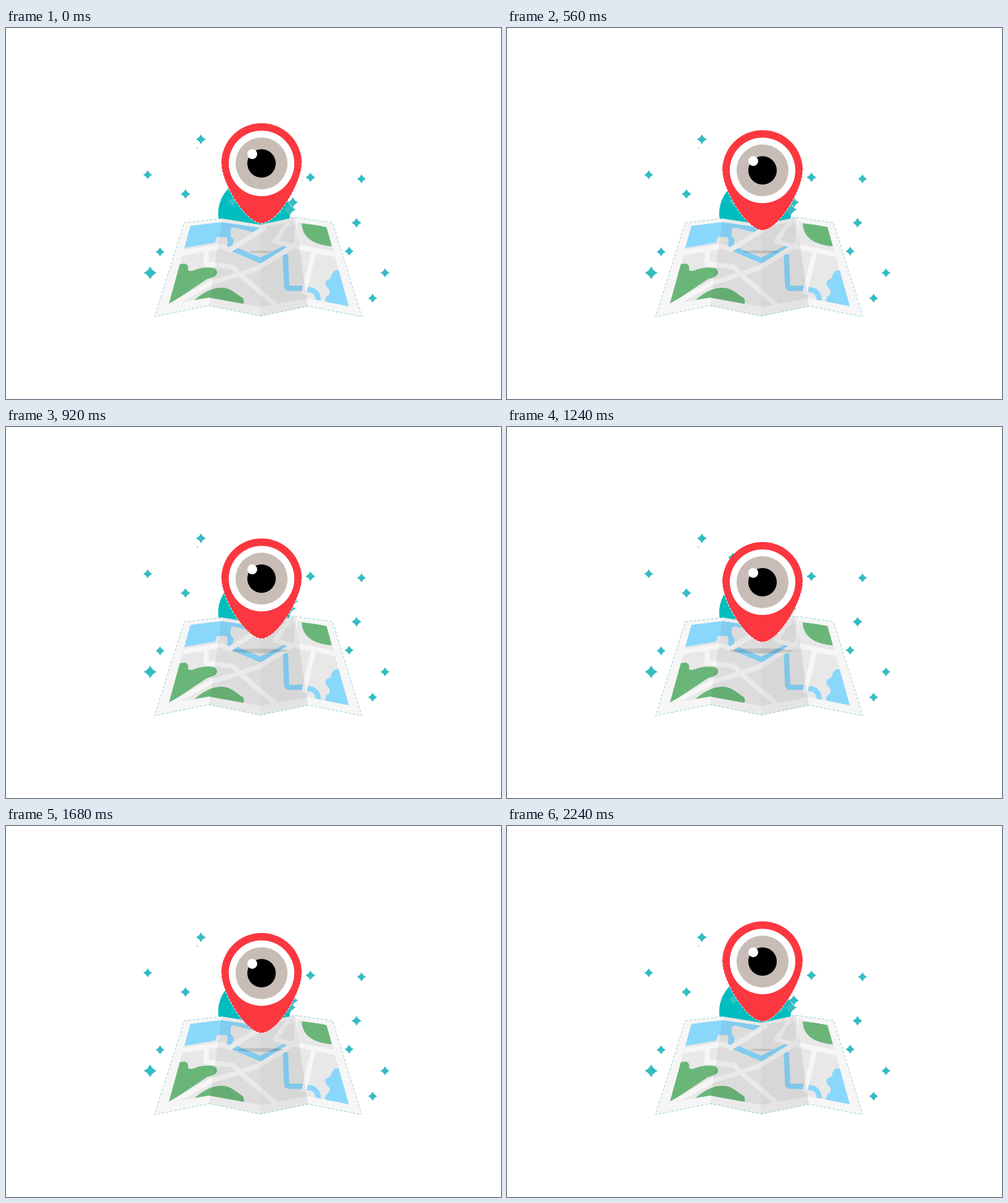
Write an HTML page that moves like this. It is 800 px wide and 600 px high and loops after 2280 ms.

```html
<!DOCTYPE html>
<html lang="en">
<head>
<meta charset="utf-8">
<title>Map pin</title>
<style>
  html, body { margin: 0; width: 100%; height: 100%; overflow: hidden; background: #fff; }
  svg { display: block; width: 800px; height: 600px; }
  .road { fill: none; stroke: #f6f6f6; stroke-width: 8; stroke-linejoin: round; }
  .river { fill: none; stroke: #8ad7fc; stroke-width: 8.5; stroke-linejoin: round; }
  .water { fill: #8ad7fc; }
  .park { fill: #6ab679; }
  .land { fill: #e8e8e8; }
</style>
</head>
<body>
<svg viewBox="0 0 800 600">
  <defs>
    <clipPath id="inner"><path d="M298 320L348 314L411 323L467 312L518 322L554 450L488 437L411 451L328 436L263 447Z"/></clipPath>
    <clipPath id="lidClip"><rect id="lidRect" x="360" y="173" width="106" height="0"/></clipPath>
  </defs>

  <circle cx="401" cy="300" r="58" fill="#00bdbf"/>
  <g id="stars" fill="#34bcc3"></g>
  <path d="M308 192l3 3.5-2-.5z" fill="#34bcc3"/>

  <!-- folded map -->
  <path d="M288 315L349 308L411 318L467 306L528 315L575 467L488 450L411 466L328 449L240 467Z"
        fill="#f6f6f6" stroke="#45b5bd" stroke-width=".6" stroke-dasharray="4 3"/>
  <g clip-path="url(#inner)">
    <path class="land" d="M240 300H580V470H240Z"/>
    <path class="water" d="M298 320L348 313L412 323L398 331L358 357L286 357Z"/>
    <path class="land" d="M286 356L338 347L340 340Q341 337 346 338L355 338Q358 339 358 343L357 360L286 368Z"/>
    <path class="land" d="M363 328Q363 322 370 323L402 331L366 354L368 342Q363 338 363 334Z"/>
    <path class="river" d="M364 356L411 376L457 353"/>
    <path class="river" d="M451.5 366L453.5 417Q453.5 421 458 421L484 421"/>
    <path class="river" d="M486 423Q504 422 505 442"/>
    <path class="water" d="M530 393Q538 390 540 394L556 452L516 444Q515 435 521 432Q526 427 521 421Q513 414 518 408Q526 406 526 399Z"/>
    <path class="park" d="M478 316L520 321L527 353C501 351 479 342 478 316Z"/>
    <path class="park" d="M280 382L289 381Q296 383 294 391Q297 395 306 391Q318 386 335 388Q342 391 341 397Q339 403 325 406L262 448Z"/>
    <path class="road" d="M282 364L349 353L361 359L420 322"/>
    <path class="road" d="M324 358L323 381L367 387L381 401L438 450"/>
    <path class="road" d="M258 453L332 412L378 398L408 388L470 349"/>
    <path class="road" d="M458 314L435 345L466 353L540 368"/>
    <path class="road" d="M467 310L468 348"/>
    <path class="land" d="M452 324L466 317L467 345Q465 349 458 348L444 344Z"/>
    <path class="road" d="M498 359L481 430"/>
    <path class="park" d="M299 445Q325 420 348 420C363 420 370 429 383 437Q387 444 381 449L328 436Z"/>
  </g>
  <path d="M349 308L411 318V466L328 449Z" opacity=".05"/>
  <path d="M411 318L467 306L488 450L411 466Z" opacity=".075"/>

  <ellipse id="shadow" cx="411" cy="362" fill="#000" opacity=".13"/>

  <g id="pin">
    <path d="M348 219C348 183 377 154 413 154S478 183 478 219C478 251 438 316 413 316C388 316 348 251 348 219Z" fill="#fb373f"/>
    <path d="M478 219C478 251 438 316 413 316C388 316 348 251 348 219" fill="none" stroke="#fff" stroke-width="1" stroke-dasharray="4 2"/>
    <circle cx="413" cy="219" r="53" fill="#fff"/>
    <circle cx="413" cy="219" r="42" fill="#c7bdb6"/>
    <circle cx="413" cy="219" r="23"/>
    <circle cx="398" cy="204" r="8" fill="#fff"/>
    <g clip-path="url(#lidClip)">
      <circle cx="413" cy="217.5" r="44" fill="#fb343b"/>
      <circle cx="413" cy="217.5" r="35.5" fill="none" stroke="#fb2228" stroke-width="3.5"/>
    </g>
  </g>
</svg>
<script>
  const LOOP = 2280, STEP = 40, DROP = 32;
  const DOWN = 130, LOW = 1210;
  const BLINK = 400, HALF_BLINK = 160;
  const el = id => document.getElementById(id);
  const pin = el('pin'), shadow = el('shadow'), lid = el('lidRect');

  // x, y, radius, optional fill
  const stars = [
    [315, 180, 8], [229, 237.5, 7.5], [290, 268.5, 8], [492, 241.5, 8],
    [574.5, 244, 7.5], [566.5, 315, 8], [554.5, 361, 7.5], [612.5, 396, 7.5],
    [592.5, 437, 7.5], [249, 362, 7.5], [233, 396, 10.5], [365, 211, 8],
    [463.5, 282, 8.5], [458, 293.5, 10.5], [442, 297, 6, '#32c4c8'], [366, 281, 8, '#32c4c8']
  ];
  el('stars').innerHTML = stars.map(([x, y, r, fill]) => {
    const c = r * 0.3;
    const d = `M0 ${-r}Q${c} ${-c} ${r} 0Q${c} ${c} 0 ${r}Q${-c} ${c} ${-r} 0Q${-c} ${-c} 0 ${-r}Z`;
    return `<path transform="translate(${x} ${y})" d="${d}"${fill ? ` fill="${fill}"` : ''}/>`;
  }).join('');

  const ease = x => {
    x = Math.min(1, Math.max(0, x));
    return x * x * (3 - 2 * x);
  };

  function draw(t) {
    const k = t < LOW ? ease((t - DOWN) / (LOW - DOWN)) : 1 - ease((t - LOW) / (LOOP - LOW));
    pin.setAttribute('transform', `translate(0 ${DROP * k})`);
    shadow.setAttribute('rx', 18 + 34 * k);
    shadow.setAttribute('ry', 1.7 + 2.3 * k);
    lid.setAttribute('height', 90 * ease(1 - Math.abs(t - BLINK) / HALF_BLINK));
  }

  const start = performance.now();
  function tick() {
    const t = (performance.now() - start) % LOOP;
    draw(Math.floor(t / STEP) * STEP);
    requestAnimationFrame(tick);
  }
  tick();
</script>
</body>
</html>
```
